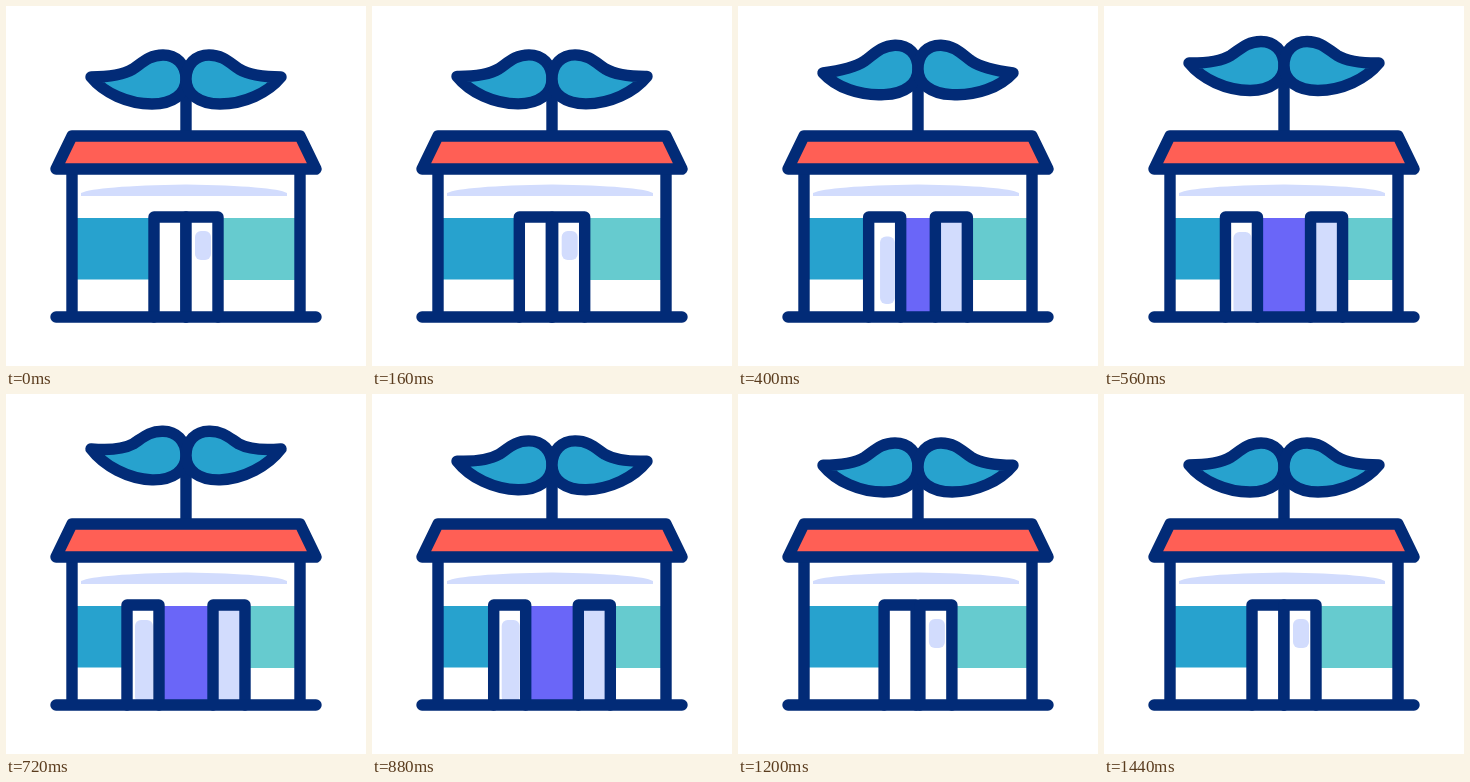
Animation of 360x360 px, one loop 1480 ms. Source, as an HTML page with a canvas:

```html
<!DOCTYPE html>
<html lang="en">
<head>
<meta charset="utf-8">
<title>Barber shop</title>
<style>
html, body { margin: 0; width: 100%; height: 100%; overflow: hidden; background: #fff; }
canvas { display: block; width: 360px; height: 360px; }
</style>
</head>
<body>
<canvas id="stage" width="360" height="360"></canvas>
<script>
const ctx = document.getElementById('stage').getContext('2d');
const LOOP = 1480, STEP = 40;
const NAVY = '#022b77', BLUE = '#27a2ce', TEAL = '#66cbcf', RED = '#ff5f55';
const PURPLE = '#6a66f8', LAVENDER = '#d2dcfd', WHITE = '#fff';

const mix = (a, b, k) => a + (b - a) * k;
const ease = k => (1 - Math.cos(Math.PI * k)) / 2;

// Eased value at time t from a list of [time, value] keys.
function at(keys, t) {
  if (t <= keys[0][0]) return keys[0][1];
  for (let i = 1; i < keys.length; i++) {
    const [t0, v0] = keys[i - 1], [t1, v1] = keys[i];
    if (t <= t1) return mix(v0, v1, ease((t - t0) / (t1 - t0)));
  }
  return keys[keys.length - 1][1];
}

const slideKeys = [[110, 0], [600, 27], [835, 27], [1275, 0]];
const liftKeys = [[140, 0], [530, -13.5], [640, -13.5], [960, 0]];
const flapKeys = [[100, 0], [160, -0.5], [390, 6], [560, -0.5], [760, -5], [1040, 3], [1240, 0]];

function box(x, y, w, h, color) {
  ctx.fillStyle = color;
  ctx.fillRect(x, y, w, h);
}

function shape(d, fill, stroke = true) {
  const path = new Path2D(d);
  if (fill) {
    ctx.fillStyle = fill;
    ctx.fill(path);
  }
  if (stroke) ctx.stroke(path);
}

// The tint is given in the coordinates of the closed door.
function door(x, shift, [left, top, right, bottom]) {
  ctx.save();
  ctx.translate(shift, 0);
  box(x, 211, 32, 100, WHITE);
  if (right > left && bottom > top) {
    ctx.fillStyle = LAVENDER;
    ctx.beginPath();
    ctx.roundRect(left, top, right - left, bottom - top, 6);
    ctx.fill();
  }
  shape(`M${x} 311V211H${x + 32}V311`);
  ctx.restore();
}

function leftTint(t) {
  const grow = at([[200, 0], [480, 1], [880, 1], [1180, 0]], t);
  return [mix(174, 156, grow), mix(250, 226, grow), 174, mix(250, 309, grow)];
}

function rightTint(t) {
  const grow = at([[160, 0], [390, 1], [880, 1], [1120, 0]], t);
  return [mix(189, 183, grow), mix(225, 213, grow), mix(205, 210, grow), mix(254, 311, grow)];
}

function moustacheHalf(side, lift, flap) {
  const p = (dx, y) => `${180 + side * dx} ${y + lift + flap * (dx / 95) ** 2} `;
  shape('M' + p(0, 73) +
    'C' + p(0, 58) + p(10, 49) + p(23, 49) +
    'C' + p(37, 49) + p(44, 57) + p(53, 63) +
    'C' + p(63, 69) + p(78, 71) + p(95, 71) +
    'C' + p(82, 87) + p(58, 98) + p(34, 98) +
    'C' + p(13, 98) + p(0, 88) + p(0, 73) + 'Z', BLUE);
}

function draw(t) {
  const slide = at(slideKeys, t), lift = at(liftKeys, t), flap = at(flapKeys, t);
  box(0, 0, 360, 360, WHITE);
  ctx.strokeStyle = NAVY;
  ctx.lineWidth = 11.4;
  ctx.lineCap = ctx.lineJoin = 'round';

  shape('M75 190V187Q90 180 180 178.5Q268 180 281 187V190Z', LAVENDER, false);
  box(66, 212, 82, 61.5, BLUE);
  box(212, 212, 82, 62, TEAL);
  box(148, 212, 64, 99, PURPLE);
  door(148, -slide, leftTint(t));
  door(180, slide, rightTint(t));

  shape('M66 163V311M294 163V311M50 311H310');
  shape(`M180 ${75 + lift}V130`);
  shape('M66 130H294L310 163H50Z', RED);
  moustacheHalf(-1, lift, flap);
  moustacheHalf(1, lift, flap);
}

const start = performance.now();
function tick(now) {
  const t = Math.max(0, now - start) % LOOP;
  draw(Math.floor(t / STEP) * STEP);
  requestAnimationFrame(tick);
}
draw(0);
requestAnimationFrame(tick);
</script>
</body>
</html>
```
